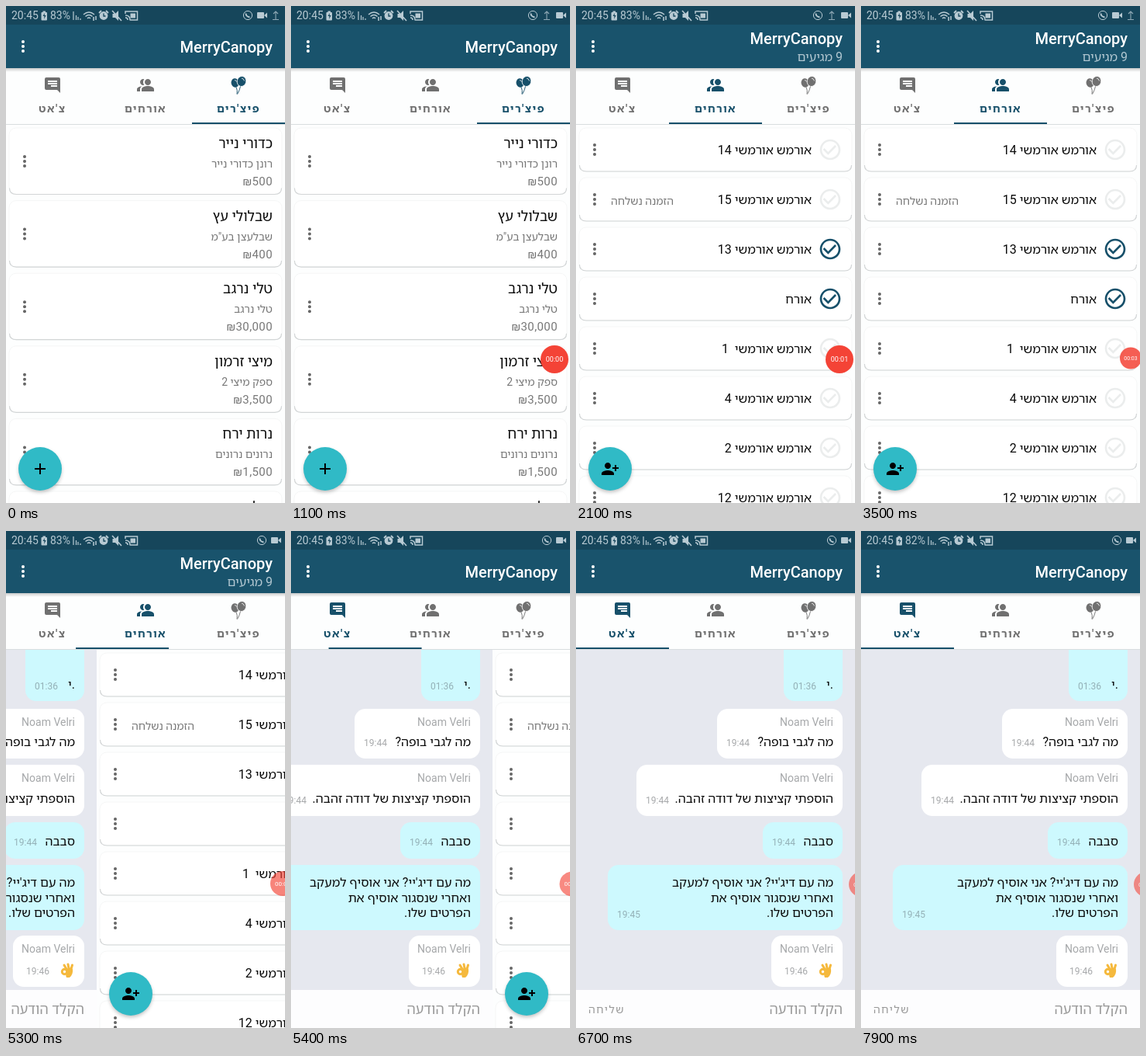
These frames come from a looping animation (360 by 640 pixels, 8 s). An HTML page:

```html
<!DOCTYPE html>
<html lang="he">
<head>
<meta charset="utf-8">
<title>Wedding planner</title>
<style>
  html, body { margin: 0; width: 100%; height: 100%; overflow: hidden; background: #fff; }
  svg { display: block; width: 100vw; height: 100vh; }
  text { font-family: Roboto, "Noto Sans Hebrew", "Open Sans", "Noto Sans", sans-serif; white-space: pre; }
</style>
</head>
<body>
<svg id="stage" viewBox="0 0 360 640"></svg>
<script>
const LOOP = 8000, STEP = 100;
const NAVY = '#17506a', GREY = '#707070', INK = '#0a0a0a';

const rtl = (x, y, size, fill, str, extra = '') =>
  `<text direction="rtl" x="${x}" y="${y}" font-size="${size}" fill="${fill}" ${extra}>${str}</text>`;
const ltr = (x, y, size, fill, str, extra = '') =>
  `<text x="${x}" y="${y}" font-size="${size}" fill="${fill}" ${extra}>${str}</text>`;
const rect = (x, y, w, h, fill, r = 0, extra = '') =>
  `<rect x="${x}" y="${y}" width="${w}" height="${h}" rx="${r}" fill="${fill}" ${extra}/>`;
const circle = (x, y, r, extra = '') => `<circle cx="${x}" cy="${y}" r="${r}" ${extra}/>`;
const line = (d, width = 1.3) =>
  `<path d="${d}" fill="none" stroke="currentColor" stroke-width="${width}"/>`;
const at = (x, y, body, extra = '') => `<g transform="translate(${x} ${y})" ${extra}>${body}</g>`;
const mirror = body => `<g transform="matrix(-1 0 0 1 24 0)">${body}</g>`;
const dots = (x, y, fill) =>
  [-6, 0, 6].map(d => circle(x, y + d, 2, `fill="${fill}"`)).join('');
const card = (y, h) =>
  rect(4, y, 352, h, '#fff', 9, 'stroke="#f1f2f2" stroke-width=".7"') +
  `<path d="M4.5 ${y + h - 8}q0 8 9 8h333q9 0 9-8" fill="none" stroke="#d2d5d6" stroke-width="1.2"/>`;

const ICON = {
  chat: mirror('<path d="M20 2H4a2 2 0 0 0-2 2v18l4-4h14a2 2 0 0 0 2-2V4a2 2 0 0 0-2-2M6 9h12v2H6M14 14H6v-2h8M18 8H6V6h12"/>'),
  people: mirror('<path d="M16.67 13.13C18.04 14.06 19 15.32 19 17v3h4v-3c0-2.18-3.57-3.47-6.33-3.87zM15 12c2.21 0 4-1.79 4-4s-1.79-4-4-4c-.47 0-.91.1-1.33.24C14.5 5.27 15 6.58 15 8s-.5 2.73-1.33 3.76c.42.14.86.24 1.33.24zM9 12c2.21 0 4-1.79 4-4s-1.79-4-4-4-4 1.79-4 4 1.79 4 4 4zm0 1c-2.67 0-8 1.34-8 4v3h16v-3c0-2.66-5.33-4-8-4z"/>'),
  balloons: '<ellipse cx="7.6" cy="9" rx="5" ry="5.8" transform="rotate(-12 7.6 9)"/>' +
    '<ellipse cx="16" cy="7" rx="5.800" ry="6.600" transform="rotate(14 16 7)" stroke="#fff" stroke-width=".8"/>' +
    '<path d="M9 14.500q2 4 1 9M14.500 13.500q-1 5-4 10" fill="none" stroke="currentColor" stroke-width=".9"/>' +
    '<path d="M16 3q3 .5 3.500 3.500M7 5.500q2 .3 2.800 2" fill="none" stroke="#fff" stroke-width=".8"/>',
  addPerson: mirror('<path d="M15 12c2.21 0 4-1.79 4-4s-1.79-4-4-4-4 1.79-4 4 1.79 4 4 4zm-9-2V7H4v3H1v2h3v3h2v-3h3v-2H6zm9 4c-2.67 0-8 1.34-8 4v2h16v-2c0-2.66-5.33-4-8-4z"/>'),
  plus: '<path d="M11 5h2v6h6v2h-6v6h-2v-6H5v-2h6z"/>',
  check: '<path transform="scale(1.333)" d="M16.59 7.58L10 14.17l-3.59-3.58L5 12l5 5 8-8zM12 2C6.480 2 2 6.480 2 12s4.480 10 10 10 10-4.480 10-10S17.520 2 12 2zm0 18c-4.420 0-8-3.580-8-8s3.580-8 8-8 8 3.580 8 8-3.580 8-8 8z"/>'
};

const fab = icon => circle(44, 598.5, 27.5, 'fill="#000" opacity=".25" filter="url(#soft)"') +
  circle(44, 596, 28, 'fill="#30bac6"') + at(32, 584, ICON[icon]);

function featuresPage() {
  const rows = [
    ['כדורי נייר', 'רונן כדורי נייר', '500'],
    ['שבלולי עץ', 'שבלעצן בע"מ', '400'],
    ['טלי נרגב', 'טלי נרגב', '30,000'],
    ['מיצי זרמון', 'ספק מיצי 2', '3,500'],
    ['נרות ירח', 'נרונים נרונים', '1,500'],
    ['דגלים', '', '']
  ];
  return rect(0, 152, 360, 488, '#fdfefe') + rows.map(([name, vendor, price], i) => {
    const y = 93.6 * i;
    return card(157 + y, 85.5) + rtl(344, 183 + y, 18, INK, name) +
      rtl(344, 208 + y, 14, '#777', vendor) +
      (price && rtl(344, 231 + y, 15, '#777', '₪' + price, 'letter-spacing=".4"')) +
      dots(24, 200 + y, '#666');
  }).join('') + fab('plus');
}

function guestsPage() {
  const rows = [' 14', ' 15', ' 13', null, '  1', ' 4', ' 2', ' 12'];
  return rect(0, 152, 360, 488, '#fdfefe') + rows.map((suffix, i) => {
    const y = 185 + 64 * i, going = i === 2 || i === 3;
    return card(y - 28, 56) +
      rtl(304, y + 6, 16, INK, suffix === null ? 'אורח' : 'אורמש אורמשי' + suffix) +
      at(312, y - 16, ICON.check, `fill="${going ? NAVY : '#ebeded'}"`) +
      dots(24, y, '#666') + (i === 1 ? rtl(126, y + 7, 14, '#777', 'הזמנה נשלחה') : '');
  }).join('') + fab('addPerson');
}

function chatPage() {
  const bubble = (x, top, bottom, mine, clock, clockX, clockY, body, sender) =>
    rect(x, top, 344 - x, bottom - top, mine ? '#cdf9fe' : '#fff', 14) +
    (sender ? rtl(332, top + 22, 14, '#a6a8aa', 'Noam Velri') : '') +
    ltr(clockX, clockY, 12, mine ? '#93b0b6' : '#a6a8aa', clock) + body;
  const say = (y, ...lines) => lines.map((s, i) => rtl(332, y + 19.5 * i, 16, INK, s)).join('');
  const hand = at(313, 556,
    '<g fill="none" stroke="#f5b93d" stroke-width="3" stroke-linecap="round">' +
    '<path d="M8 8L5 3M11 7L10 2M14 8L15.5 3"/><circle cx="5.5" cy="11.5" r="3.2"/></g>' +
    '<path d="M8 8q5-3 8 0 1 7-4 11H8q-2-4 1-7z" fill="#f5b93d"/>');
  return rect(0, 152, 360, 488, '#e6e8ef') +
    bubble(268, 130, 219, true, '01:36', 280, 204, say(203, '.י')) +
    bubble(182, 229, 293, false, '19:44', 194, 277, say(277, 'מה לגבי בופה?'), true) +
    bubble(78, 301, 367, false, '19:44', 90, 351, say(350, 'הוספתי קציצות של דודה זהבה.'), true) +
    bubble(241, 375, 422, true, '19:44', 253, 405, say(405, 'סבבה')) +
    bubble(41, 430, 514, true, '19:45', 53, 498,
      say(458, "מה עם דיג'יי? אני אוסיף למעקב", 'ואחרי שנסגור אוסיף את', 'הפרטים שלו.')) +
    bubble(252, 521, 587, false, '19:46', 269, 571, hand, true) +
    rect(0, 591, 360, 49, '#fdfdfe') +
    rtl(344, 622, 18, '#999', 'הקלד הודעה') +
    rtl(63, 621, 14, '#999', 'שליחה', 'letter-spacing="1.5"');
}

function statusBar() {
  const tint = 'fill="currentColor"', back = '#16465b';
  return rect(0, 0, 360, 24, back) + `<g color="#b8cad3">` +
    ltr(7, 17, 14, 'currentColor', '20:45') +
    rect(45.5, 8, 7.5, 10.5, 'currentColor', 1) + rect(47.5, 6.5, 3.5, 2, 'currentColor') +
    `<path d="M50 9l-2.500 4h2l-.5 4 2.700-5h-2z" fill="${back}"/>` +
    ltr(57, 17, 14, 'currentColor', '83%', 'id="battery"') +
    line('M87 7v11M90.500 12v6M93 14v4M96 16v2', 1.2) +
    line('M100 11q7-6 14 0M102.500 13.500q4.500-4 9 0M105 16q2-2 4 0M113 14v5M116 13v5', 1.5) +
    circle(126, 12.5, 5.4, tint) + line('M120 9l3-3M132 9l-3-3', 1.8) +
    `<path d="M126 9.500v3.500h2.500" fill="none" stroke="${back}" stroke-width="1.3"/>` +
    `<path d="M137.500 10h3.500l4-4v13l-4-4h-3.500z" ${tint}/>` + line('M137 6l12 13', 1.6) +
    line('M154 10V7h15.500v11h-10M154 12q6 0 6 6M154 15q3 0 3 3', 1.5) + rect(160.5, 9.5, 6.5, 6, 'currentColor') +
    at(0, 0, circle(0, 0, 5.6, 'fill="none" stroke="currentColor"') +
      line('M-2.500-2.500q0 4 5 5', 1.8), 'id="phone"') +
    at(0, 0, rect(-6, -4, 9, 8, 'currentColor', 1) + `<path d="M3 0l4-3.500v7z" ${tint}/>`, 'id="video"') +
    at(0, 0, line('M-4 5.500h8M0 5.500V-5M-3-2l3-3 3 3', 1.1), 'id="upload" opacity=".75"') + '</g>';
}

const tabs = [
  ['פיצ\'רים', 300, 'balloons'], ['אורחים', 180, 'people'], ['צ\'אט', 60, 'chat']
];
const tabBar = rect(0, 80, 360, 72, '#fdfefe') + rect(0, 80, 360, 5, 'url(#shade)') +
  rect(0, 152, 360, 1, '#d9dddf') +
  tabs.map(([label, x, icon]) => `<g class="tab" fill="currentColor">` + at(x - 12, 90, ICON[icon]) +
    `<text direction="rtl" text-anchor="middle" x="${x}" y="137" font-size="14" font-weight="600" letter-spacing="1.5">${label}</text></g>`).join('') +
  rect(240, 150, 120, 2, NAVY, 0, 'id="bar"');

document.getElementById('stage').innerHTML =
  `<defs><filter id="soft" x="-30%" y="-30%" width="160%" height="160%"><feGaussianBlur stdDeviation="2.5"/></filter>
   <linearGradient id="shade" x2="0" y2="1"><stop stop-color="#000" stop-opacity=".2"/><stop offset="1" stop-color="#000" stop-opacity="0"/></linearGradient></defs>` +
  [featuresPage, guestsPage, chatPage].map(page => `<g class="page">${page()}</g>`).join('') +
  tabBar + rect(0, 24, 360, 56, '#19536c') + dots(22, 52, '#fff') +
  rtl(344, 60, 20, '#fff', 'MerryCanopy', 'id="title" font-weight="500"') +
  rtl(344, 71, 16, '#b3c8d2', '9 מגיעים', 'id="subtitle"') + statusBar() +
  '<g id="recorder">' + circle(0, 0, 18, 'fill="#f44336"') +
  ltr(0, 3.2, 9, '#fff', '00:00', 'id="counter" text-anchor="middle"') + '</g>';

const $ = id => document.getElementById(id);
const pages = [...document.querySelectorAll('.page')];
const tabNodes = [...document.querySelectorAll('.tab')];
const move = (node, x, y, scale = 1) =>
  node.setAttribute('transform', `translate(${x} ${y}) scale(${scale})`);
const show = (node, on) => node.setAttribute('visibility', on ? 'visible' : 'hidden');

// Linear interpolation over rows of [time, ...values].
function track(keys, t) {
  const next = keys.findIndex(k => k[0] > t);
  if (next === 0) return keys[0].slice(1);
  if (next < 0) return keys[keys.length - 1].slice(1);
  const a = keys[next - 1], b = keys[next], u = (t - a[0]) / (b[0] - a[0]);
  return a.slice(1).map((v, i) => v + (b[i + 1] - v) * u);
}

const swipe = [
  [1500, 0], [1600, 40], [1700, 105], [1800, 160], [1900, 290], [2000, 350], [2100, 360],
  [5100, 360], [5200, 392], [5300, 477], [5400, 620], [5500, 705], [5600, 720]
];
// time, x, y, radius, opacity
const dock = [
  [3300, 340, 455, 18, 1], [3500, 348, 453.5, 14, .85], [3600, 357, 454, 16, .65],
  [5300, 357, 454, 16, .65], [5500, 368, 455, 16, .58]
];

function render(t) {
  const [offset] = track(swipe, t);
  pages.forEach((page, i) => {
    const x = offset - 360 * i;
    show(page, Math.abs(x) < 360);
    move(page, x, 0);
  });
  const [barOffset] = track(swipe, t > 5000 ? t - 32 : t);
  $('bar').setAttribute('x', 240 - barOffset / 3);

  const active = t < 1900 ? 0 : t < 5400 ? 1 : 2;
  tabNodes.forEach((tab, i) => tab.setAttribute('color', i === active ? NAVY : GREY));
  $('title').setAttribute('y', active === 1 ? 49 : 60);
  show($('subtitle'), active === 1);

  const uploading = t < 4900, swapped = t >= 1000 && t < 2400;
  move($('phone'), uploading ? 312 : 330, 12);
  move($('video'), uploading && !swapped ? 330 : 348, 12);
  move($('upload'), swapped ? 330 : 348, 12);
  show($('upload'), uploading);
  $('battery').textContent = t < 6800 ? '83%' : '82%';

  const [x, y, radius, opacity] = track(dock, t);
  show($('recorder'), t >= 300);
  move($('recorder'), x, y, radius / 18);
  $('recorder').setAttribute('opacity', opacity);
  $('counter').textContent = '00:0' + Math.max(0, Math.floor((t - 300) / 1000));
}

const start = performance.now();
function tick() {
  const t = (performance.now() - start) % LOOP;
  render(Math.floor(t / STEP) * STEP);
  requestAnimationFrame(tick);
}
tick();
</script>
</body>
</html>
```
